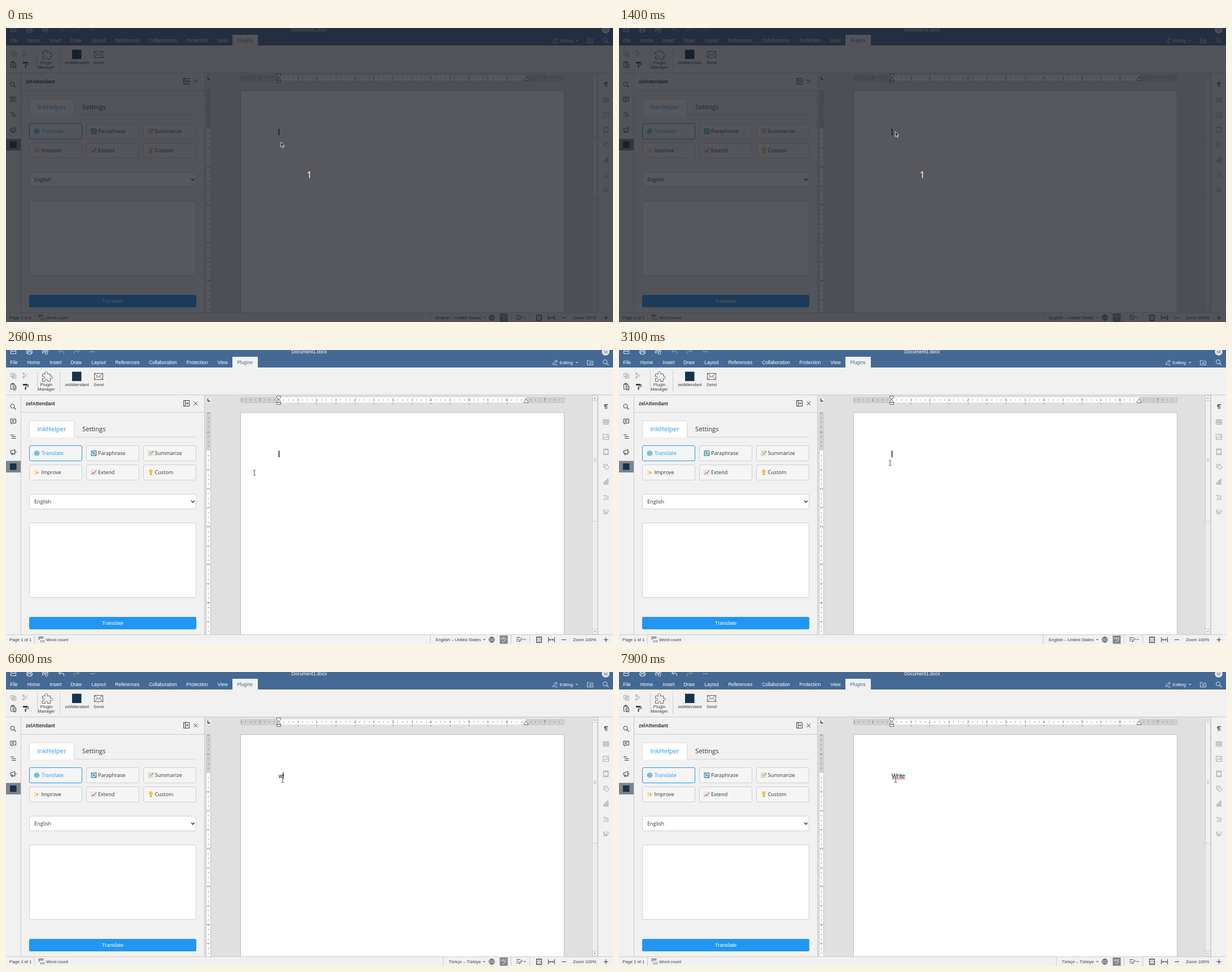
Animation of 1075 by 521 pixels, one loop 8 s. Source, as an HTML page:

```html
<!DOCTYPE html>
<html lang="en">
<head>
<meta charset="utf-8">
<title>Document editor</title>
<style>
html, body { margin: 0; width: 100%; height: 100%; overflow: hidden; background: #f1f1f1; }
svg { display: block; }
text { font-family: "Liberation Sans", Arial, sans-serif; white-space: pre; }
.open { font-family: "Open Sans", sans-serif; }
.count { font-family: "Noto Sans", sans-serif; }
</style>
</head>
<body>
<svg id="stage" width="1075" height="521" viewBox="0 0 1075 521"></svg>
<script>
const LOOP = 8000, INCH = 67.3, UI = 8.41, SMALL = 7.7, FORM = 9.12;
const INK = '#3c3c3c', FAINT = '#a9a9a9', LINE = '#cbcbcb', BLUE = '#2196f3', HEAD = '#446995', LOGO = '#15334d';

const rect = (x, y, w, h, fill, more = '') =>
  `<rect x="${x}" y="${y}" width="${w}" height="${h}" fill="${fill}" ${more}/>`;
const box = (x, y, w, h, fill, stroke, r = 0) =>
  rect(x + .5, y + .5, w - 1, h - 1, fill, `stroke="${stroke}" rx="${r}"`);
const path = (d, stroke = INK, width = 1, fill = 'none', more = '') =>
  `<path d="${d}" stroke="${stroke}" stroke-width="${width}" fill="${fill}" ${more}/>`;
const disc = (x, y, r, fill, stroke = 'none', width = 1) =>
  `<circle cx="${x}" cy="${y}" r="${r}" fill="${fill}" stroke="${stroke}" stroke-width="${width}"/>`;
const text = (x, y, s, size = UI, fill = INK, more = '') =>
  `<text x="${x}" y="${y}" font-size="${size}" fill="${fill}" ${more}>${s}</text>`;
const at = (x, y, body, more = '') => `<g transform="translate(${x} ${y})" ${more}>${body}</g>`;
const MID = 'text-anchor="middle"';
const chevron = (x, y, c, w = 1, s = 2) => path(`M${x - s} ${y - s / 2}l${s} ${s}l${s} ${-s}`, c, w);
const lens = (x, y, c) => at(x, y, disc(-1, -1, 3.6, 'none', c) + path('M1.7 1.7L5 5', c, 1.1));

function header() {
  const tabs = [['File', 14], ['Home', 49], ['Insert', 88], ['Draw', 124], ['Layout', 164], ['References', 215],
    ['Collaboration', 278], ['Protection', 338.5], ['View', 383.5]];
  return rect(0, 0, 1075, 31, HEAD) + rect(401, 12, 45, 20, '#f1f1f1') +
    tabs.map(([s, x]) => text(x, 25, s, UI, '#fff', MID)).join('') +
    text(423, 25, 'Plugins', UI, HEAD, MID) +
    text(537, 5.8, 'Document1.docx', UI, '#fff', MID) +
    path('M8.5-1V6.500H17.500V-1M10.500 0V2.500H15.500V0', '#e4eaf1') +
    path('M38.500 5.500H36.500V1.500H46.500V5.500H44.500M38.500 3.500H44.500V7.500H38.500ZM38.500 1V-2M44.500 1V-2', '#e4eaf1') +
    path('M67 5.500H64.500V1.500H74.500V3M66.500 1V-2M72.500 1V-2M67 3.500H70', '#e4eaf1') + disc(71.5, 5.5, 2.2, 'none', '#e4eaf1') +
    `<g id="undo">${path('M96.500-1L93.500 2L96.500 5M94 2H99Q102.500 2 102.500 5V7', '#fff')}</g>` +
    path('M126.500-1L129.500 2L126.500 5M129 2H124Q120.500 2 120.500 5V7', '#fff', 1, 'none', 'opacity=".4"') +
    [150, 153, 156].map(x => disc(x, 3, .8, '#e4eaf1')).join('') +
    path('M968.500 26L969.300 22.800L974.500 17.600L976.700 19.800L971.500 25ZM973 19L975.300 21.300M972 26.500H977', '#dbe4ee', .9) +
    text(980.5, 24.8, 'Editing', SMALL, '#fff') + chevron(1011, 22, '#fff') +
    path('M1029.500 26.500V18.500H1033L1034.500 20H1039.500V26.500ZM1032 23.200H1036.500M1035 21.500L1036.700 23.200L1035 25', '#dbe4ee', .9) +
    lens(1062, 22, '#dbe4ee') + disc(1062, 3, 6.8, '#e3e7ec') + text(1062, 5.7, 'M', 7.5, '#53647a', MID);
}

function toolbar() {
  const label = (x, y, s) => text(x, y, s, SMALL, INK, MID);
  return rect(0, 31, 1075, 48, '#f1f1f1') + rect(0, 79, 1075, 1, LINE) +
    path('M8.500 41.500H14.500V47.500H8.500ZM11.500 43.500H17.500V50.500H11.500ZM13 46H16M13 48H16', FAINT) +
    path('M30.500 41L37.500 48M30.500 49L38.500 42', FAINT) + disc(31, 42, 1.6, 'none', FAINT) + disc(31, 48.5, 1.6, 'none', FAINT) +
    path('M11 69.500H8.500V60.500H15.500V62.500M10.500 60V59H13.500V61H10.500ZM12.500 63.500H17.500V70.500H12.500ZM14 66.500H16M14 68.500H16') +
    rect(30, 60, 8, 3, INK) + path('M38 61.500H39.500V65H34.500V66') + rect(33.5, 66, 2, 4.5, INK) +
    rect(55, 37, 1, 37, LINE) + rect(95, 37, 1, 37, LINE) +
    path('M64.500 42.500H69.500C68 39.500 69.500 38.500 71.200 38.500S74.500 39.500 73 42.500H78.500V46.500C81.500 45.200 82 47 82 48.500S81.200 51.500 78.500 50.300V55.500H73.500C74.500 52.500 73 51.800 71.500 51.800S68.500 52.800 69.500 55.500H64.500V50.500C67.500 51.500 68 50 68 48.500S67 46 64.500 47Z', '#555', .9) +
    label(71.5, 63.7, 'Plugin') + label(71.5, 71.8, 'Manager') +
    rect(117, 38.5, 16.5, 16.5, LOGO) + label(125.5, 63.7, 'zelAttendant') +
    path('M156.500 41.500H171.500V52.500H156.500ZM156.500 41.500L164 48L171.500 41.500M156.500 52.500L162 46.500M171.500 52.500L166 46.500', '#555', .9) +
    label(164, 63.7, 'Send');
}

function leftStrip() {
  return rect(0, 80, 27, 424, '#f1f1f1') + rect(26, 80, 1, 424, LINE) + lens(12.5, 100.5, INK) +
    path('M8 122.500H17.500V129.500H12L10 131.500V129.500H8ZM10 125H15.500M10 127.200H14') +
    path('M8 150.500H14M10 153.500H17.500M10 156.500H17.500') +
    path('M8 178.500H11L15.500 176V185L11 182.500H8ZM10 183V185.500H12V183M17 178.500Q18.500 180.500 17 182.500') +
    rect(0, 196.500, 26, 20.500, '#7d858c') + rect(7, 201, 11.5, 11.5, LOGO);
}

const emoji = {
  globe: disc(5, 5, 4.7, '#3f9fd6') + path('M.5 5H9.500M1.500 2.500H8.500M1.500 7.500H8.500M5 .5V9.500', '#c5e6f5', .6) +
    `<ellipse cx="5" cy="5" rx="2.3" ry="4.500" fill="none" stroke="#c5e6f5" stroke-width=".6"/>`,
  cycle: rect(0, 0, 10, 10, '#5b9bb3', 'rx="1.300"') + path('M2 5A3 3 0 0 1 7.300 3.200M8 5A3 3 0 0 1 2.700 6.800', '#fff', 1.1) +
    path('M8.300 1.800V4.400H5.700ZM1.700 8.200V5.600H4.300Z', 'none', 0, '#fff'),
  memo: rect(.5, .5, 7.5, 9.3, '#e9eaec', 'stroke="#b5b9bd" stroke-width=".5"') +
    path('M2 3H6.500M2 5H6M2 7H5', '#8a9298', .6) + path('M4 7.500L9 2', '#f0a72b', 1.7) + path('M8.500 2.600L9.600 1.300', '#d9534f', 1.7),
  sparkle: path('M5.800 1Q6.200 4.600 9.800 5Q6.200 5.400 5.800 9.500Q5.400 5.400 2 5Q5.400 4.600 5.800 1ZM2 .3Q2.200 1.800 3.700 2Q2.200 2.200 2 3.700Q1.800 2.200 .3 2Q1.800 1.800 2 .3ZM2 6.300Q2.200 7.800 3.700 8Q2.200 8.200 2 9.700Q1.800 8.200 .3 8Q1.800 7.800 2 6.300Z', 'none', 0, '#f7b92c'),
  chart: rect(.3, .5, 9.4, 9, '#eef1f3', 'stroke="#bcc6cc" stroke-width=".5"') + path('M3.500 .5V9.500M6.500 .5V9.500M.5 3.500H9.500M.5 6.500H9.500', '#cfd8dd', .4) +
    path('M1 8.500L3.500 5.500L5.300 6.700L9.200 1.500', '#d84a4a', 1.1),
  bulb: path('M3.400 7.200Q3.400 6 2.500 5A3.300 3.300 0 1 1 7.500 5Q6.600 6 6.600 7.200Z', 'none', 0, '#fbc53a') + rect(3.5, 7.2, 3, 2.4, '#8797a1', 'rx=".7"')
};

function panel() {
  const buttons = [['Translate', 'globe', 13.5], ['Paraphrase', 'cycle', 12.5], ['Summarize', 'memo', 12],
    ['Improve', 'sparkle', 13], ['Extend', 'chart', 12.5], ['Custom', 'bulb', 12]];
  const grid = buttons.map(([s, icon, gap], i) => {
    const x = 41 + i % 3 * 101, y = i < 3 ? 169 : 203, on = i === 0;
    return box(x, y, 94, 28, '#f5f5f5', on ? BLUE : '#cfcfcf', 2.5) +
      at(x + 8.5, y + 9, emoji[icon]) + text(x + 8.5 + gap, y + 17.1, s, FORM, on ? BLUE : '#333', 'class="open"');
  }).join('');
  return rect(27, 80, 324, 424, '#f1f1f1') + rect(351, 80, 1, 424, LINE) + rect(27, 110, 324, 1, LINE) +
    text(35, 97.8, 'zelAttendant', 8.6, '#333', 'font-weight="bold"') +
    path('M314.500 89.500H324.500V99.500H314.500ZM317.500 89.500V99.500M323 94.500H319.500M321.300 92.500L319.300 94.500L321.300 96.500') +
    path('M332.500 91.500L339 98M339 91.500L332.500 98') +
    rect(41, 154, 296, 1, '#d5d5d5') + path('M41.500 155V126.500Q41.500 125.500 43 125.500H119Q120.500 125.500 120.500 126.500V155', '#d9d9d9', 1, '#fff') +
    text(81, 144.3, 'InkHelper', 11.22, BLUE, 'class="open" ' + MID) +
    text(135, 144.3, 'Settings', 11.22, '#333', 'class="open"') + grid +
    box(41, 255, 296, 27, '#fff', '#cfcfcf', 2.5) + text(50, 272, 'English', FORM, '#333', 'class="open"') + chevron(331, 268.500, '#222', 1.4, 2.8) +
    box(41, 306, 296, 133, '#fff', '#cfcfcf', 2.5) +
    rect(41, 473, 296, 22, BLUE, 'rx="2.500"') + text(189, 487.200, 'Translate', 9.33, '#fff', MID);
}

function rulers() {
  let s = box(416, 84, 573, 10, '#d0d0d0', '#c4c4c4') + rect(483, 84, 438, 9.500, '#fff') +
    box(354, 111, 9, 394, '#fff', '#c4c4c4') + rect(354, 111, 9, 67.500, '#d0d0d0');
  const mark = i => i % 4 === 0 ? 5 : 2;
  for (let i = -8; i < 60; i++) {
    const x = Math.round(483 + i * INCH / 8), y = Math.round(178.5 + i * INCH / 8), inch = i % 8 === 0 && i > 0;
    const h = mark(i);
    if (x < 988 && i !== 0)
      s += inch ? text(x + .3, 91, i / 8, 7, '#555', MID) : rect(x, 88.5 - h / 2, 1, h, '#777');
    if (y < 503 && i !== 0)
      s += inch ? text(0, 0, i / 8, 7, '#555', `${MID} transform="translate(361 ${y}) rotate(-90)"`) : rect(358.5 - h / 2, y, h, 1, '#777');
    if (i > 0 && i % 4 === 0 && x < 900) s += rect(x, 94, 1, 2, '#777');
  }
  return s + path('M479.500 81.500H486.500V84.500L483 88L479.500 84.500ZM479.500 92.500V91.500L483 88L486.500 91.500V92.500ZM479.500 93H486.500V96.500H479.500Z', '#555', .9, '#fff') +
    path('M917.500 93.500V91L921 87.500L924.500 91V93.500Z', '#555', .9, '#fff') +
    box(354, 84, 10, 10, '#f1f1f1', '#dedede') + path('M357.500 86V90.500H361.500', '#222', 1.3);
}

function rightSide() {
  const g = FAINT;
  return box(1038, 80, 10, 424, '#ededed', '#d4d4d4') + box(1038, 80, 10, 10, '#f1f1f1', LINE) + box(1038, 494, 10, 10, '#f1f1f1', LINE) +
    box(1038, 89, 10, 215, '#f1f1f1', LINE) + path('M1041 86L1043 83.500L1045 86ZM1041 498L1043 500.500L1045 498Z', 'none', 0, '#999') +
    path('M1041 193.500H1045M1041 195.500H1045M1041 197.500H1045', '#bbb') +
    rect(1048, 80, 27, 424, '#f1f1f1') + rect(1048, 80, 1, 424, LINE) +
    path('M1061.500 104.500V96.500H1066M1064 96.500V104.500', INK, 1.1) + path('M1062 96A2.500 2.500 0 0 0 1062 101Z', 'none', 0, INK) +
    path('M1057.500 123.500H1067.500V131.500H1057.500ZM1057.500 126H1067.500M1057.500 128.500H1067.500M1061 124V131M1064.500 124V131', g) +
    path('M1057.500 149.500H1067.500V158.500H1057.500ZM1058 157L1061 153.500L1063 155.500L1065 153.500L1067 156', g) + disc(1064.5, 152, .9, g) +
    path('M1058.500 175.500H1066.500V185.500H1058.500ZM1058.500 177H1066.500M1058.500 184H1066.500', g, 1.2) +
    path('M1061 208H1058.500V202.500H1064.500V204', g) + disc(1064, 208, 3.3, 'none', g) +
    path('M1058.500 238V234.500H1060.500V238ZM1061.500 238V231.500H1063.500V238ZM1064.500 238V228.500H1066.500V238Z', g) +
    text(1062.5, 262.5, 'Ta', 9.5, g, MID) + path('M1058 265.500Q1062 263 1067 265.500', g) +
    path('M1058 283.500L1060 291L1066 282.500M1061 282Q1057 289 1062 290Q1066 289 1068 284M1063 291.500L1067 286', g);
}

function statusBar() {
  const div = x => rect(x, 505, 1, 16, LINE);
  return rect(0, 504, 1075, 17, '#f1f1f1') + rect(0, 504, 1075, 1, LINE) + div(50) + div(894) + div(927) +
    text(6, 515.8, 'Page 1 of 1', SMALL) + text(71, 515.8, 'Word count', SMALL) +
    path('M57.500 508.500H66.500M57.500 510.500H66.500M57.500 512.500H60', INK, .9) + text(60, 518, '123', 5.2) +
    rect(0, 505, 1, 16, LINE, 'id="langDiv"') + text(841, 515.8, '', SMALL, INK, 'id="lang" text-anchor="end"') + chevron(847, 513, INK) +
    disc(860.3, 513.2, 4.8, 'none', INK, .9) + path('M855.500 513.200H865M860.300 508.400V518M856.500 510.500H864M856.500 516H864', INK, .7) +
    `<ellipse cx="860.300" cy="513.200" rx="2.300" ry="4.800" fill="none" stroke="${INK}" stroke-width=".7"/>` +
    rect(874.5, 506, 14, 14.5, '#7d858c') + text(881.5, 512.5, 'ABC', 5.3, '#fff', MID) + path('M879 515.500L881 517.500L885 513', '#fff', 1) +
    path('M904 509.500H911M904 512.500H908M904 515.500H907M908.500 517L909.300 514.500L913 510.800L914.500 512.300L910.800 516Z', INK, .9) + chevron(918.5, 513, INK) +
    path('M939.500 508.500H948.500V518.500H939.500ZM944 509V512M944 515V518M940 513.500H942.500M945.500 513.500H948', INK) + path('M942 511L940 509M946 511L948 509M942 516L940 518M946 516L948 518', INK, .8) +
    path('M960.500 509V518M971.500 509V518M962 513.500H970M963.800 511.700L962 513.500L963.800 515.300M968.200 511.700L970 513.500L968.200 515.300', INK) +
    path('M984 513.500H992M1058.500 513.500H1066.500M1062.500 509.500V517.500', INK, 1.1) + text(1004, 515.8, 'Zoom 100%', SMALL);
}

const stage = document.getElementById('stage');
stage.innerHTML = rect(0, 0, 1075, 521, '#f1f1f1') + rect(352, 80, 687, 424, '#e0e0e0') +
  box(415, 110.5, 574, 400, '#fff', '#bebebe') + rulers() + header() + toolbar() + leftStrip() + panel() + rightSide() +
  text(483, 188, '', 10.28, '#000', 'id="typed"') + path('M483 189.200H506.800', '#e02020', .9, 'none', 'id="spell"') +
  rect(0, 178.5, 1.4, 11.5, '#000', 'id="caret"') + statusBar() +
  `<g id="dim">${rect(0, 0, 1075, 521, 'rgb(24,27,33)', 'opacity=".73"')}${text(537, 266, '1', 17, '#fff6ea', 'class="count" ' + MID)}</g>` +
  `<g id="arrow">${path('M0 0V9L2.100 7.100L3.700 10.600L5.200 9.900L3.600 6.500H6.400Z', '#f2f2f2', .9, '#25272b')}</g>` +
  `<g id="beam">${path('M-2-4.500H-.5L0-4L.5-4.500H2M-2 4.500H-.5L0 4L.5 4.500H2M0-4V4', '#fff', 2.2, 'none', 'opacity=".7"')}${path('M-2-4.500H-.5L0-4L.5-4.500H2M-2 4.500H-.5L0 4L.5 4.500H2M0-4V4', '#444', 1)}</g>`;

const part = id => document.getElementById(id);
const undo = part('undo'), lang = part('lang'), langDiv = part('langDiv'), typed = part('typed'), spell = part('spell'),
  caret = part('caret'), dim = part('dim'), arrow = part('arrow'), beam = part('beam');

// Values hold until the next key.
const last = (keys, t) => keys.filter(k => k[0] <= t).pop();
const arrowKeys = [[0, 486.8, 202], [100, 488, 196], [200, 489.2, 189], [300, 489.8, 184.2],
  [1400, 489.2, 183.5], [1500, 488.6, 183], [2500, 485.2, 183]];
// Time, typed text, caret position.
const typing = [[0, '', 483], [6600, 'w', 490.4], [7000, 'wr', 493.9], [7200, 'writ', 499],
  [7300, 'write', 504.700], [7400, 'Write ', 509.5]];

function beamAt(t) {
  const u = Math.min(1, (t - 2600) / 700), e = u * u * (3 - 2 * u);
  const settle = Math.max(0, Math.min(1, (t - 3300) / 300));
  return [440 + 50 * e, 217.5 - 21.5 * e - 4.8 * settle];
}

const show = (el, on) => el.setAttribute('visibility', on ? 'visible' : 'hidden');
const move = (el, x, y) => el.setAttribute('transform', `translate(${x} ${y})`);

function draw(time) {
  const t = Math.floor(time % LOOP / 100) * 100;
  const dark = t < 2600, edited = t >= 6600;
  show(dim, dark);
  show(arrow, dark);
  show(beam, !dark);
  if (dark) move(arrow, ...last(arrowKeys, t).slice(1));
  else move(beam, ...beamAt(t));
  const [, word, x] = last(typing, t);
  typed.textContent = word;
  caret.setAttribute('x', x - .2);
  show(caret, t < 7900);
  show(spell, t >= 7800);
  undo.setAttribute('opacity', edited ? 1 : .4);
  lang.textContent = edited ? 'Türkçe – Türkiye' : 'English – United States';
  langDiv.setAttribute('x', edited ? 774 : 751);
}

const start = performance.now();
function tick() {
  draw(performance.now() - start);
  requestAnimationFrame(tick);
}
tick();
</script>
</body>
</html>
```
